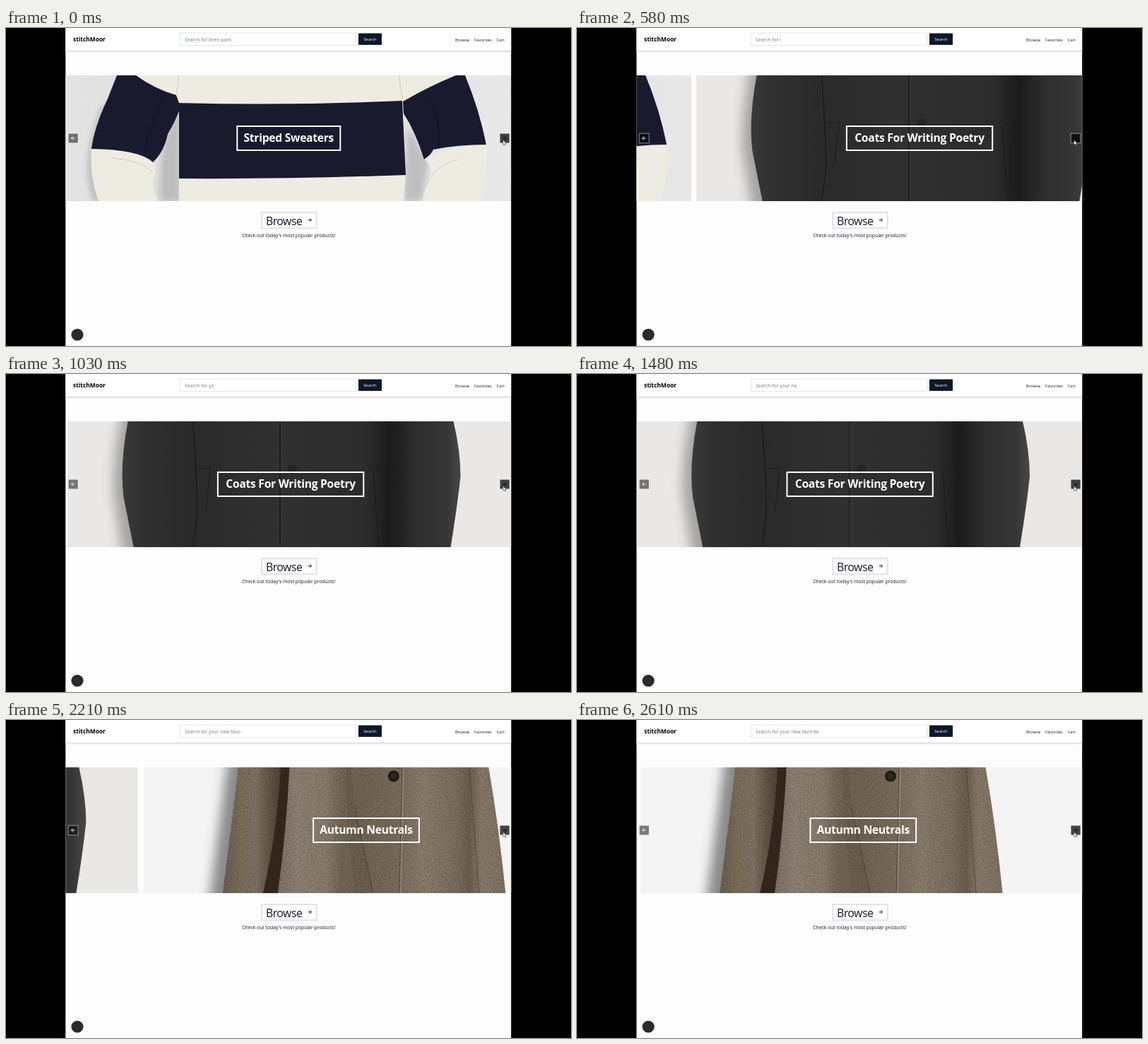
Recreate the animation shown at these times as an HTML page. Size 800 by 450 pixels, loop 2640 ms.

```html
<!DOCTYPE html>
<html lang="en">
<head>
<meta charset="utf-8">
<title>Shop carousel</title>
<style>
  html, body { margin: 0; width: 100%; height: 100%; overflow: hidden; background: #000; }
  svg { display: block; width: 800px; height: 450px; font: 5.9px "Open Sans", "Noto Sans", sans-serif; }
  .ink { fill: #0f172a; }
  .body { font-size: 6.8px; }
  .brand { font-size: 8.4px; font-weight: 700; }
  .browse { font-size: 15.8px; letter-spacing: -.5px; }
  .title rect { fill: none; stroke: #fff; stroke-width: 2; }
  .title text { font-size: 15.7px; font-weight: 700; letter-spacing: -.3px; fill: #fff; text-anchor: middle; }
  .line { fill: none; stroke-width: 1; }
  .button rect { stroke: #fff; stroke-opacity: .6; stroke-width: .8; }
</style>
</head>
<body>
<svg viewBox="0 0 800 450">
  <defs>
    <clipPath id="window"><rect x="84.3" y="67" width="630.9" height="178"/></clipPath>
    <path id="arrow" d="M-2.5 0H2.5M0-2.5 2.5 0 0 2.5" fill="none"/>
    <linearGradient id="headerShadow" x2="0" y2="1">
      <stop stop-color="#d6d6d6"/><stop offset="1" stop-color="#fdfdfd"/>
    </linearGradient>
    <linearGradient id="sweaterBack">
      <stop stop-color="#e3e3e4"/><stop offset=".5" stop-color="#dcdcdd"/><stop offset="1" stop-color="#e8e8e9"/>
    </linearGradient>
    <linearGradient id="coat">
      <stop stop-color="#3a3a3b"/><stop offset=".06" stop-color="#303031"/><stop offset=".2" stop-color="#2a2a2b"/>
      <stop offset=".45" stop-color="#303031"/><stop offset=".72" stop-color="#2c2c2d"/>
      <stop offset=".79" stop-color="#1b1b1c"/><stop offset=".87" stop-color="#2e2e2f"/>
      <stop offset=".96" stop-color="#363637"/><stop offset="1" stop-color="#484849"/>
    </linearGradient>
    <linearGradient id="sleeve">
      <stop stop-color="#6f6253"/><stop offset=".3" stop-color="#83745f"/><stop offset=".55" stop-color="#85766a"/>
      <stop offset=".75" stop-color="#675a4b"/><stop offset="1" stop-color="#4a3d32"/>
    </linearGradient>
    <linearGradient id="wool">
      <stop offset=".06" stop-color="#84766a"/><stop offset=".14" stop-color="#95877a"/><stop offset=".26" stop-color="#8f8173"/>
      <stop offset=".32" stop-color="#786a5b"/><stop offset=".42" stop-color="#76685a"/><stop offset=".56" stop-color="#807262"/>
      <stop offset=".66" stop-color="#908271"/><stop offset=".79" stop-color="#827464"/>
      <stop offset=".85" stop-color="#706354"/><stop offset=".9" stop-color="#8e806f"/><stop offset="1" stop-color="#857766"/>
    </linearGradient>
    <filter id="tweed" x="0" y="0" width="1" height="1" color-interpolation-filters="sRGB">
      <feTurbulence type="fractalNoise" baseFrequency=".8" numOctaves="2" seed="4"/>
      <feColorMatrix values="0 0 0 0 .1  0 0 0 0 .08  0 0 0 0 .05  .9 0 0 0 -.35"/>
      <feComposite in2="SourceAlpha" operator="in" result="grain"/>
      <feMerge><feMergeNode in="SourceGraphic"/><feMergeNode in="grain"/></feMerge>
    </filter>
    <filter id="soft" x="-.3" y="-.3" width="1.6" height="1.6"><feGaussianBlur stdDeviation="4"/></filter>
    <filter id="softer" x="-.3" y="-.3" width="1.6" height="1.6"><feGaussianBlur stdDeviation="8"/></filter>
  </defs>

  <rect x="84.3" width="630.9" height="450" fill="#fdfdfd"/>
  <rect x="84.3" y="31.7" width="630.9" height="3.5" fill="url(#headerShadow)"/>
  <rect x="84.3" width="630.9" height="31.7" fill="#fff"/>
  <text class="brand" x="95" y="19">stitchMoor</text>
  <rect x="246.3" y="7" width="249.2" height="17.6" fill="#fff" stroke="#dde2ea" stroke-width=".9"/>
  <text id="prompt" class="body" x="253" y="18.7" fill="#747c8b"></text>
  <rect class="ink" x="499" y="7.5" width="33" height="16.4"/>
  <text x="515.4" y="18.4" fill="#fff" text-anchor="middle">Search</text>
  <g class="ink">
    <text x="636" y="18.6">Browse</text>
    <text x="663" y="18.6">Favorites</text>
    <text x="694.5" y="18.6">Cart</text>
  </g>

  <g clip-path="url(#window)">
    <g id="track">
      <g>
        <rect x="84" y="67" width="631" height="178" fill="url(#sweaterBack)"/>
        <path d="M136 110Q105 180 122 245H150V110ZM240 120Q215 170 218 245H246V120ZM568 140 598 190 588 245H564Z" fill="#999" opacity=".5" filter="url(#soft)"/>
        <g fill="#eeebe2">
          <path d="M180 67H645L562 105 566 208 563 245H245V105Z"/>
          <path d="M121 170Q170 168 208 189 215 203 207 217 209 232 215 245H131Q118 210 121 170Z"/>
          <path d="M680 164Q630 166 591 185 605 193 600 210L589 245H671Q685 200 680 164Z"/>
        </g>
        <g fill="#191a2e">
          <path d="M245 106Q400 110 561 103L566 208Q400 214 245 213Z"/>
          <path d="M157 67H184Q210 86 241 95L247 112Q241 130 229 150 224 175 208 190 190 172 121 171 125 140 144 100Z"/>
          <path d="M650 67H637Q600 82 562 104L563 121Q580 147 592 186 603 178 605 172 640 165 680 165 670 115 650 67Z"/>
        </g>
        <path class="line" d="M241 95 245 67M562 104 556 67M150 184Q190 187 208 204M640 186Q605 195 596 222" stroke="#cfc9bc"/>
        <path class="line" d="M222 100Q205 135 196 172M598 98Q618 130 612 168" stroke="#101122" stroke-width="3"/>
        <g class="title"><rect x="327.3" y="139" width="146" height="34"/><text x="400.3" y="161">Striped Sweaters</text></g>
      </g>

      <g transform="translate(637.5)">
        <rect x="84.5" y="67" width="630" height="178" fill="#e9e8e6"/>
        <path d="M162 50Q146 130 150 175L164 265H400V50Z" fill="#8d8c8a" opacity=".75" filter="url(#softer)"/>
        <path d="M170 67Q158 130 164 175L178 245H627Q636 190 641 145 641 110 631 67Z" fill="url(#coat)"/>
        <g class="line" stroke="#1b1b1c">
          <path d="M262 67Q268 150 268 200L262 245M385.5 67V245M545 67Q532 160 538 245" stroke-width="1.6"/>
          <path d="M265 135 287 133 280 195M517 138 543 136M518 138 525 245"/>
        </g>
        <path class="line" d="M388 67V245" stroke="#3a3a3b"/>
        <circle cx="403" cy="135" r="7.5" fill="#252526" stroke="#333334"/>
        <g class="title"><rect x="297.3" y="139" width="206.4" height="34"/><text x="400.5" y="161">Coats For Writing Poetry</text></g>
      </g>

      <g transform="translate(1275)">
        <rect x="84.5" y="67" width="630" height="178" fill="#f4f4f4"/>
        <path d="M206 40 176 270H400V40Z" fill="#777" opacity=".85" filter="url(#softer)"/>
        <g filter="url(#tweed)">
          <path d="M270 67H573.5Q588 150 597.5 245H255Z" fill="url(#wool)"/>
          <path d="M219 67Q213 120 197 245H262Q278 160 284 67Z" fill="url(#sleeve)"/>
          <path d="M279 67H291.5Q287 160 275 245H254Q274 160 279 67Z" fill="#35291f"/>
          <path d="M380 67 383 120 410 245H385Q370 150 372 67Z" fill="#706354"/>
        </g>
        <g class="line" stroke="#4c4037">
          <path d="M383 120Q392 160 410 245"/>
          <path d="M451 67 447 245M546 67 560 245" stroke-width=".8"/>
        </g>
        <path class="line" d="M453 67 449 245" stroke="#a39482"/>
        <circle cx="439" cy="79.5" r="8" fill="#211a16"/>
        <circle cx="439" cy="79.5" r="4.5" fill="#302720"/>
        <g class="title"><rect x="325.3" y="139" width="149.8" height="34"/><text x="400.2" y="161">Autumn Neutrals</text></g>
      </g>
    </g>
  </g>

  <g class="button">
    <rect x="88.2" y="149.2" width="13.8" height="13.6" fill-opacity=".5"/>
    <use href="#arrow" transform="translate(95 156) scale(-1 1)" stroke="#fff" stroke-width=".9"/>
    <rect x="699.2" y="149.2" width="13.8" height="13.6" fill-opacity=".72"/>
    <use href="#arrow" x="706" y="156" stroke="#0a0a0a" stroke-width=".9"/>
  </g>
  <path d="M703.8 158.5V165.3L705.4 163.9 706.4 166 707.4 165.5 706.4 163.5H708.4Z" fill="#fff" stroke="#222" stroke-width=".5"/>

  <rect x="362.2" y="261" width="77.4" height="22.3" fill="#fff" stroke="#dfe2e8" stroke-width="2"/>
  <text class="browse ink" x="368" y="278.6">Browse</text>
  <use href="#arrow" x="430" y="271.7" stroke="#0f172a" stroke-width=".9"/>
  <text class="body" x="400.3" y="296" text-anchor="middle" fill="#111827">Check out today's most popular products!</text>
  <circle cx="101" cy="434" r="8.6" fill="#2b2b2b"/>
</svg>
<script>
const LOOP = 2640, PITCH = 637.5, SLIDE_STARTS = [247, 1912], STEPS_PER_MS = 0.0613;
const track = document.getElementById("track");
const prompt = document.getElementById("prompt");

// Damped spring: share of the way covered after some time.
function glide(ms) {
  const n = Math.max(0, ms) * STEPS_PER_MS;
  return 1 - 1.853 * 0.8805 ** n + 0.853 * 0.7723 ** n;
}

function promptAt(t) {
  const left = 10 - Math.floor((t - 30) / 62 + 1);
  const typed = Math.max(0, Math.floor((t - 733) / 106));
  return "Search for " + (left > 0 ? "linen pant".slice(0, left) : "your new favorite".slice(0, typed));
}

function draw(now) {
  const t = now % LOOP;
  const shift = SLIDE_STARTS.reduce((sum, start) => sum + glide(t - start), 0);
  track.setAttribute("transform", `translate(${(-PITCH * shift).toFixed(2)})`);
  const text = promptAt(t);
  if (prompt.textContent !== text) prompt.textContent = text;
}

const begin = performance.now();
function tick() {
  draw(performance.now() - begin);
  requestAnimationFrame(tick);
}
tick();
</script>
</body>
</html>
```
